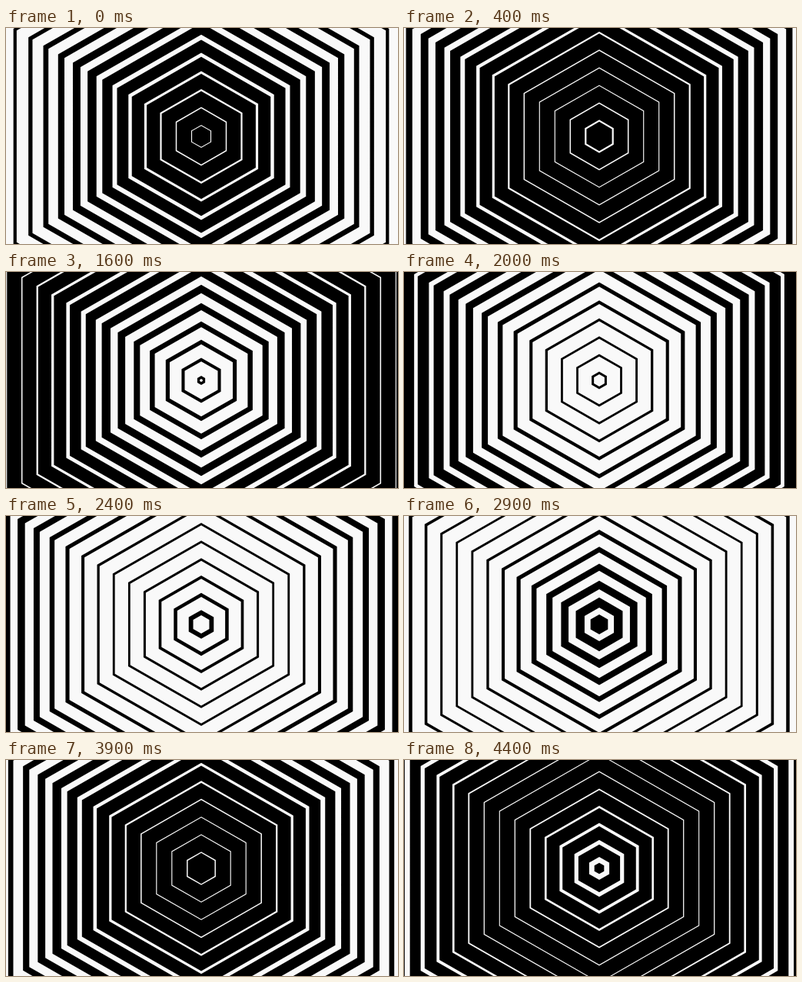
Animation, 510 px wide and 283 px high, one loop 4.5 s. Source, as an HTML page with a canvas:

```html
<!DOCTYPE html>
<html lang="en">
<head>
<meta charset="utf-8">
<title>Hexagon waves</title>
<style>
  html, body { margin: 0; width: 100%; height: 100%; overflow: hidden; background: #000; }
  canvas { display: block; }
</style>
</head>
<body>
<canvas id="stage" width="510" height="283"></canvas>
<script>
const ctx = document.getElementById('stage').getContext('2d');
const WHITE = '#f9f9f9';
const CX = 254, CY = 142;
const STEP = 100, STEPS = 45;
const PITCH = 20;         // distance between rings
const DRIFT = 6.3;        // ring travel per step
const WAVE = 595;         // length of the thickness wave
const WAVE_SPEED = 16.4;  // wave travel per step

// Pointy-top hexagon given by its apothem
function hexagon(apothem) {
  const radius = apothem / Math.cos(Math.PI / 6);
  for (let i = 0; i < 6; i++) {
    const a = Math.PI / 3 * i - Math.PI / 2;
    const x = CX + radius * Math.cos(a);
    const y = CY + radius * Math.sin(a);
    if (i) ctx.lineTo(x, y); else ctx.moveTo(x, y);
  }
  ctx.closePath();
}

function thickness(r, step) {
  const thinnest = 3 + WAVE_SPEED * step;
  return 9.2 - 8.1 * Math.cos(2 * Math.PI * (r - thinnest) / WAVE);
}

function draw(step) {
  ctx.fillStyle = '#000';
  ctx.fillRect(0, 0, 510, 283);
  ctx.fillStyle = WHITE;
  ctx.beginPath();
  const first = (12.5 + DRIFT * step) % PITCH - PITCH;
  for (let r = first; r < 280; r += PITCH) {
    const half = thickness(r, step) / 2;
    if (r + half < 0.6) continue;
    hexagon(r + half);
    if (r > half) hexagon(r - half);
  }
  ctx.fill('evenodd');
}

const start = performance.now();
let shown = -1;

function tick() {
  const elapsed = Math.max(0, performance.now() - start);
  const step = Math.floor(elapsed / STEP) % STEPS;
  if (step !== shown) draw(shown = step);
  requestAnimationFrame(tick);
}
tick();
</script>
</body>
</html>
```
